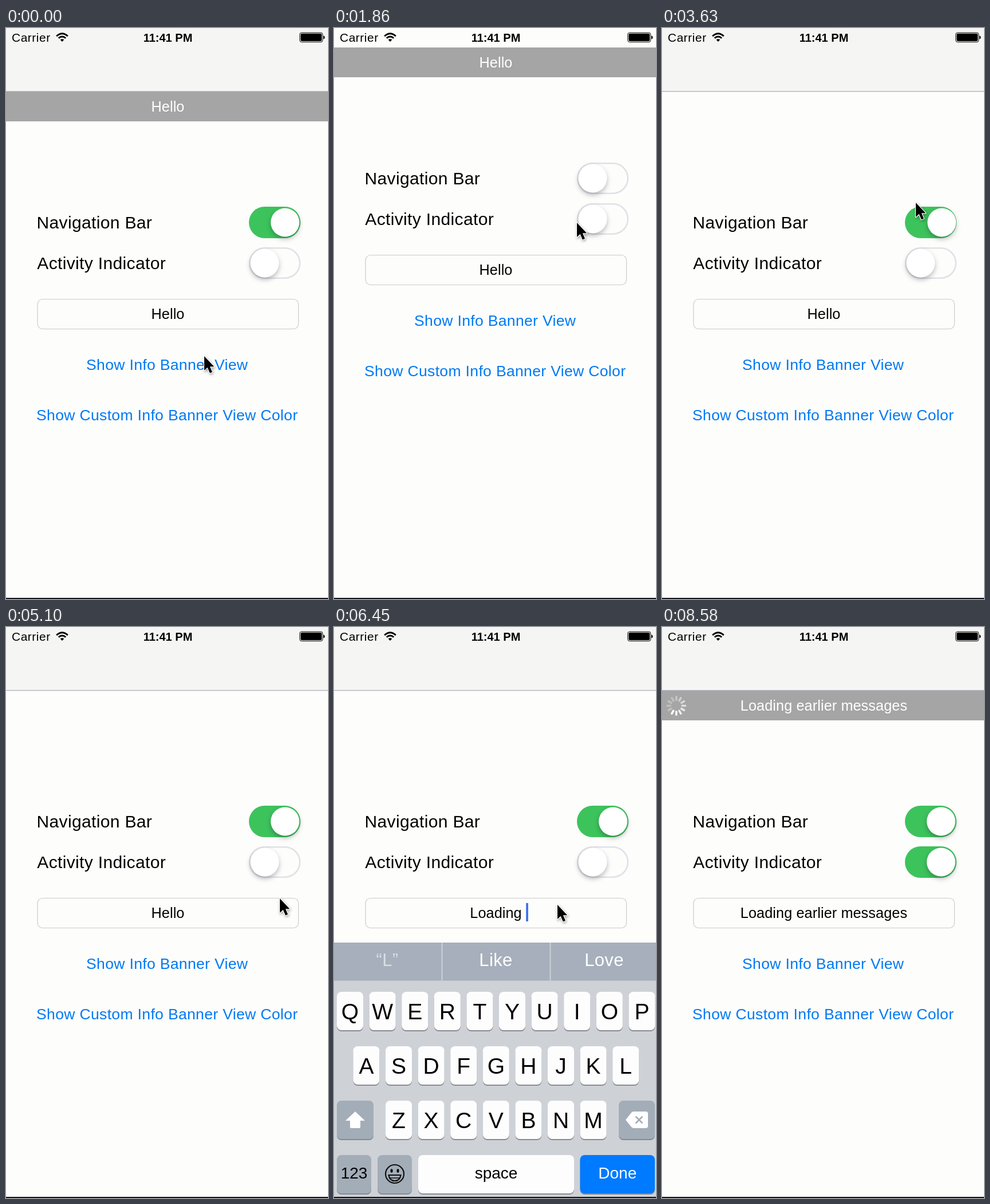
These frames come from a looping animation (562 px wide and 997 px high, 8.61 s). An HTML page:

```html
<!DOCTYPE html>
<html lang="en">
<head>
<meta charset="utf-8">
<title>Info banner demo</title>
<style>
  html, body { margin: 0; width: 100%; height: 100%; overflow: hidden; background: #fdfdfb; }
  svg { display: block; width: 100%; height: 100%; }
  text { font-family: "Liberation Sans", Arial, sans-serif; white-space: pre; letter-spacing: .35px; }
  .mid { text-anchor: middle; }
  .label { font-size: 30px; }
  .entry { font-size: 25.2px; letter-spacing: .12px; }
  .link { font-size: 26.5px; fill: #0079f4; }
  .hint { font-size: 31px; fill: #fff; }
  .cap { font-size: 39px; letter-spacing: 0; }
  .small { font-size: 28px; letter-spacing: 0; }
  .knob { fill: #fff; filter: drop-shadow(0 4px 4px rgba(0, 0, 20, .27)); }
  #cursor { filter: drop-shadow(1px 2px 2px rgba(0, 0, 0, .35)); }
</style>
</head>
<body>
<svg id="stage" viewBox="0 0 562 997" preserveAspectRatio="none">
  <rect width="562" height="997" fill="#fdfdfb"/>

  <g id="banner">
    <rect width="562" height="52" fill="#a5a5a5"/>
    <text id="bannerText" class="entry mid" x="282.5" y="35" fill="#fff"></text>
    <g id="spinner" transform="translate(25 26.5)"></g>
  </g>

  <rect id="cover" width="562" fill="#fdfdfb"/>
  <g id="nav">
    <rect width="562" height="110" fill="#f5f5f3"/>
    <rect y="110" width="562" height="1.4" fill="#b4b4c4"/>
  </g>

  <text x="10" y="24" font-size="21" style="letter-spacing:.5px">Carrier</text>
  <g fill="none" stroke="#000" stroke-width="2.8">
    <path d="M88.2 14.2Q98 5.4 107.8 14.2"/>
    <path d="M91.8 17.8Q98 12.2 104.2 17.8"/>
    <path d="M98 24L94.7 20.6Q98 17.7 101.3 20.6Z" fill="#000" stroke="none"/>
  </g>
  <text class="mid" x="282.5" y="24" font-size="20" font-weight="bold" style="letter-spacing:0">11:41 PM</text>
  <rect x="512.7" y="8.2" width="40" height="16.4" rx="3" fill="none" stroke="#000" stroke-width="1"/>
  <rect x="514.3" y="9.8" width="36.8" height="13.2" rx="1.8"/>
  <path d="M554 13.2Q556.4 14 556.4 16.4T554 19.6Z"/>

  <g id="content">
    <text class="label" x="53.5" y="350">Navigation Bar</text>
    <text class="label" x="54.3" y="421">Activity Indicator</text>
    <g id="navSwitch" transform="translate(424 312)"></g>
    <g id="busySwitch" transform="translate(424 383)"></g>
    <rect x="55" y="473.5" width="455.5" height="52" rx="9" fill="#fdfdfc" stroke="#cbcbcf" stroke-width="1.2"/>
    <text id="entry" class="entry mid" x="282.5" y="508"></text>
    <rect id="caret" y="482" width="3.6" height="32" fill="#3a6cec"/>
    <text class="link mid" x="281.2" y="597">Show Info Banner View</text>
    <text class="link mid" x="281.2" y="685">Show Custom Info Banner View Color</text>
  </g>

  <g id="keyboard">
    <rect y="551" width="562" height="446" fill="#ced2d7"/>
    <rect y="551" width="562" height="66.5" fill="#a6afbb"/>
    <path d="M188.5 551V617.5M377.5 551V617.5" stroke="#cfd4da" stroke-width="1.8"/>
    <text id="hint0" class="hint mid" x="93" y="592" style="fill:#d9dee4"></text>
    <text id="hint1" class="hint mid" x="282.5" y="592"></text>
    <text id="hint2" class="hint mid" x="471.5" y="592"></text>
    <g id="keys"></g>
    <path d="M37 846L54 862H46V873Q46 875 44 875H30Q28 875 28 873V862H20Z" fill="#fff"/>
    <path d="M509 860.5L519 848Q520.5 846 523 846H544Q548 846 548 850V871Q548 875 544 875H523Q520.5 875 519 873Z" fill="#fff"/>
    <path d="M526.5 854.5L538.5 866.5M538.5 854.5L526.5 866.5" stroke="#a3adb8" stroke-width="2.5"/>
    <g fill="none" stroke="#111" stroke-width="2.2">
      <circle cx="106" cy="955" r="16"/>
      <path d="M95.5 957H116.5Q115 967 106 967T95.5 957Z"/>
      <path d="M96.5 962H115.5" stroke-width="1.5"/>
    </g>
    <ellipse cx="100.5" cy="949.5" rx="2" ry="3.2"/>
    <ellipse cx="111.5" cy="949.5" rx="2" ry="3.2"/>
  </g>

  <rect y="995" width="562" height="2" fill="#14141c"/>
  <path id="cursor" d="M0 0V25L5.6 19.8L9.8 29.5L14 27.7L9.9 18.3H17.2Z" stroke="#fff" stroke-width="2.4" stroke-linejoin="round" paint-order="stroke"/>
</svg>

<script>
const LOOP = 8610;
const $ = id => document.getElementById(id);
const move = (id, x, y) => $(id).setAttribute("transform", `translate(${x} ${y})`);
const show = (id, on) => $(id).setAttribute("visibility", on ? "visible" : "hidden");

function add(parent, tag, attrs, text) {
  const el = document.createElementNS("http://www.w3.org/2000/svg", tag);
  for (const name in attrs) el.setAttribute(name, attrs[name]);
  if (text) el.textContent = text;
  parent.append(el);
  return el;
}

// Keyboard
function key(x, y, w, label, fill = "#fdfdfd", kind = "cap", ink = "#000") {
  const box = { x, width: w, height: 67, rx: 8 };
  add($("keys"), "rect", { ...box, y: y + 2, fill: "#878b92" });
  add($("keys"), "rect", { ...box, y, fill });
  const baseline = y + (kind === "cap" ? 48 : 41);
  add($("keys"), "text", { class: kind + " mid", x: x + w / 2, y: baseline, fill: ink }, label);
}
const rows = [["QWERTYUIOP", 5, 637], ["ASDFGHJKL", 33.4, 732], ["ZXCVBNM", 90, 827]];
for (const [letters, x, y] of rows)
  [...letters].forEach((c, i) => key(x + i * 56.6, y, 46, c));
const DIM = "#a3adb8";
key(5, 827, 64, "", DIM);
key(497, 827, 63, "", DIM);
key(5, 922, 60, "123", DIM, "small");
key(76, 922, 60, "", DIM);
key(147, 922, 272, "space", "#fdfdfd", "small");
key(429.5, 922, 130.5, "Done", "#007aff", "small", "#fff");

// Switches
function makeSwitch(id) {
  const g = $(id);
  add(g, "rect", { x: 1.3, y: 1.3, width: 87.6, height: 52.4, rx: 26.2, fill: "#fdfdfc", stroke: "#e1e1e8", "stroke-width": 2.6 });
  const fill = add(g, "rect", { width: 90, height: 55, rx: 27.5, fill: "#3dc35c" });
  const knob = add(g, "circle", { class: "knob", cy: 27.5, r: 25 });
  return on => {
    fill.setAttribute("opacity", Math.min(1, on));
    knob.setAttribute("cx", 27.5 + 35.5 * on);
  };
}
const setNav = makeSwitch("navSwitch");
const setBusy = makeSwitch("busySwitch");

// Activity spinner
const spokes = Array.from({ length: 12 }, (_, i) => add($("spinner"), "rect", {
  x: -1.8, y: -17.5, width: 3.6, height: 9, rx: 1.8, fill: "#fff", transform: `rotate(${i * 30})`
}));

// Eased value at time t from rows of [time, ...values]
function track(t, steps) {
  let i = 0;
  while (i < steps.length - 1 && steps[i + 1][0] <= t) i++;
  const [t0, ...a] = steps[i];
  const next = steps[i + 1];
  if (!next || t <= t0) return a;
  const p = (t - t0) / (next[0] - t0);
  const e = p * p * (3 - 2 * p);
  return a.map((v, j) => v + (next[j + 1] - v) * e);
}

const cursorPath = [
  [0, 346, 573], [350, 346, 573], [780, 452, 335], [960, 452, 335],
  [1340, 350, 505], [1540, 350, 505], [1860, 424, 340], [2150, 445, 266],
  [3300, 443, 264], [3420, 443, 272], [3630, 443, 305], [4300, 443, 305],
  [5100, 478, 474], [5350, 390, 485], [7400, 390, 485], [7590, 381, 353],
  [7880, 452, 404], [8000, 452, 404], [8200, 346, 580], [8330, 346, 580],
  [8550, 590, 700]
];
const navSteps = [[0, 1], [850, 1], [1080, 0], [3380, 0], [3620, 1]];
const navKnobSteps = [[0, 1], [850, 1], [1080, 0], [3380, 0], [3600, 1.04], [3760, 1]];
const bannerSteps = [[0, 1], [500, 1], [750, 0], [1500, 0], [1750, 1], [2700, 1], [2950, 0], [8270, 0], [8540, 1]];
const keyboardSteps = [[0, 446], [5280, 446], [5620, 0], [7438, 0], [7738, 446]];
const busySteps = [[0, 0], [7950, 0], [8150, 1]];

function typed(t) {
  if (t < 5900) return "Hello".slice(0, 5 - Math.max(0, Math.floor((t - 5650) / 50)));
  const n = t < 6480 ? Math.min(8, (t - 5950) / 60) : 8 + (t - 6480) / 45;
  return "Loading earlier messages".slice(0, Math.max(0, n));
}

function draw(t) {
  const [nav] = track(t, navSteps);
  const [drop] = track(t, bannerSteps);
  const [busy] = track(t, busySteps);
  const lift = 77 * (1 - nav);
  const text = typed(t);

  setNav(track(t, navKnobSteps)[0]);
  setBusy(busy);
  move("content", 0, -lift);
  move("nav", 0, -lift);
  $("nav").setAttribute("opacity", nav);
  $("cover").setAttribute("height", 111 - lift);

  move("banner", 0, 111 - lift - 52 * (1 - drop));
  $("bannerText").textContent = text;
  show("banner", drop > 0);
  show("spinner", drop > 0 && busy > 0);
  const head = Math.floor((t - 8580) / 83.3) + 7;
  spokes.forEach((s, i) => {
    const age = (((head - i) % 12) + 12) % 12;
    s.setAttribute("opacity", Math.max(0.3, 1 - age * 0.09));
  });

  const trimmed = text.trimEnd();
  $("entry").textContent = trimmed;
  const width = trimmed ? $("entry").getComputedTextLength() : 0;
  $("caret").setAttribute("x", 283 + width / 2 + (text === trimmed ? 0 : 7));
  show("caret", t > 5300 && t < 7420);

  move("keyboard", 0, track(t, keyboardSteps)[0]);
  const early = t < 6540;
  const word = early ? text.slice(0, 1) : text.split(" ").pop();
  const ready = t >= 6010 && word;
  $("hint0").textContent = ready ? `“${word}”` : "";
  $("hint0").setAttribute("x", word.length > 6 ? 88.5 : 93);
  $("hint1").textContent = ready && early ? "Like" : "";
  $("hint2").textContent = ready && early ? "Love" : "";

  move("cursor", ...track(t, cursorPath));
}

const start = performance.now();
function tick() {
  draw((performance.now() - start) % LOOP);
  requestAnimationFrame(tick);
}
tick();
</script>
</body>
</html>
```
